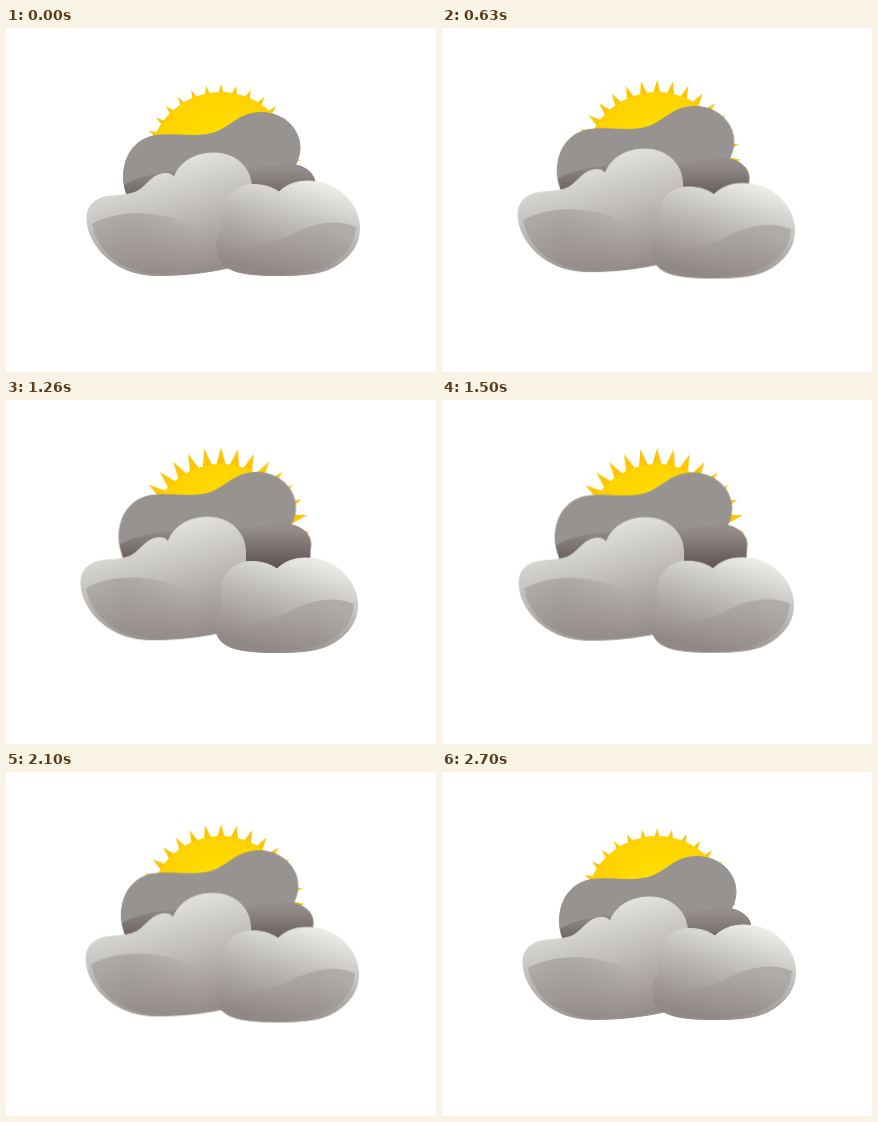
Animation of 430 by 344 pixels, one loop 2.73 s. Source, as an HTML page:

```html
<!DOCTYPE html>
<html lang="en">
<head>
<meta charset="utf-8">
<title>Sun behind clouds</title>
<style>
  html, body { margin: 0; width: 100%; height: 100%; overflow: hidden; background: #fff; }
  svg { display: block; width: 430px; height: 344px; }
  #rays { transform-origin: 215px 136px; }
</style>
</head>
<body>
<svg viewBox="0 0 430 344">
  <defs>
    <radialGradient id="sun" gradientUnits="userSpaceOnUse" cx="215" cy="122" r="84">
      <stop offset=".2" stop-color="#ffdf00"/>
      <stop offset="1" stop-color="#ffca00"/>
    </radialGradient>
    <linearGradient id="backShade" gradientUnits="userSpaceOnUse" x1="0" y1="142" x2="0" y2="176">
      <stop offset="0" stop-color="#928d8a"/>
      <stop offset="1" stop-color="#645856"/>
    </linearGradient>
    <linearGradient id="leftFill" gradientUnits="userSpaceOnUse" x1="145" y1="130" x2="176" y2="248">
      <stop offset="0" stop-color="#e8e8e5"/>
      <stop offset=".5" stop-color="#bfbcb9"/>
      <stop offset="1" stop-color="#958d8b"/>
    </linearGradient>
    <linearGradient id="leftShade" gradientUnits="userSpaceOnUse" x1="120" y1="184" x2="150" y2="248">
      <stop offset="0" stop-color="#adaaa7"/>
      <stop offset="1" stop-color="#8f8785"/>
    </linearGradient>
    <linearGradient id="rightFill" gradientUnits="userSpaceOnUse" x1="300" y1="152" x2="272" y2="248">
      <stop offset="0" stop-color="#ebebe8"/>
      <stop offset=".5" stop-color="#b9b6b3"/>
      <stop offset="1" stop-color="#918987"/>
    </linearGradient>
    <linearGradient id="rightShade" gradientUnits="userSpaceOnUse" x1="305" y1="194" x2="285" y2="248">
      <stop offset="0" stop-color="#afaba8"/>
      <stop offset="1" stop-color="#8f8785"/>
    </linearGradient>
    <linearGradient id="fadeRight">
      <stop offset=".4" stop-color="#fff"/>
      <stop offset="1" stop-color="#000"/>
    </linearGradient>
    <linearGradient id="fadeLeft">
      <stop offset=".1" stop-color="#000"/>
      <stop offset=".7" stop-color="#fff"/>
    </linearGradient>
    <mask id="leftMask" maskUnits="userSpaceOnUse" x="80" y="180" width="110" height="70">
      <rect x="80" y="180" width="110" height="70" fill="url(#fadeRight)"/>
    </mask>
    <mask id="rightMask" maskUnits="userSpaceOnUse" x="212" y="185" width="142" height="65">
      <rect x="212" y="185" width="142" height="65" fill="url(#fadeLeft)"/>
    </mask>
  </defs>

  <path id="rays" fill="#fdc400"/>
  <circle cx="215" cy="136" r="72" fill="url(#sun)"/>

  <g id="back">
    <path fill="#979390" stroke="#979390" d="M121 167C118 160 117 152 117.500 146C119 124 132 108 155 107C174 106 189 109.500 206 105.500C224 100.500 232 84.500 255 84.500C278 84.500 294 101 294 120C294 126 292 132 289.500 137C300 139 309 146 309 156L306 196H130Z"/>
    <path fill="url(#backShade)" stroke="url(#backShade)" d="M118.500 157C136 147 160 143 200 143C240 143 262 137 289.500 137C300 139 309 146 309 156L306 196H130L121 167Z"/>
  </g>

  <g id="left">
    <path fill="url(#leftFill)" stroke="url(#leftFill)" d="M81 190C81 177 90 169 106 168C116 167 123 167 131 163.500C142 157 146 146 159 145.500C165 145.500 167 147 168 150C173 134 189 125 208 125C230 125 245.500 140 245.500 160V215C245.500 229 236 237 222 240C200 245 176 247.500 152 247.500C126 247.500 108 238 95 224C86 213 81 202 81 190Z"/>
    <path fill="url(#leftShade)" mask="url(#leftMask)" d="M86 196C108 183 144 182 173 192L200 206V243C183 246 167 247 151 246C124 244 106 234 95 218C89 209 87 202 86 196Z"/>
  </g>

  <g id="right">
    <path fill="url(#rightFill)" stroke="url(#rightFill)" d="M273 164C281 156 291 153 302 153C332 153 353.500 176 353.500 200C353.500 216 345 228 331 237C317 246 298 247.500 272 247.500C250 247.500 232 246 222 240C215 236 211.500 229 211 220C210.500 212 211.500 206 217.500 202C216.500 196 217 190 217.500 184C219 167 231 156.500 247 156.500C258 156.500 266 159 273 164Z"/>
    <path fill="url(#rightShade)" mask="url(#rightMask)" d="M350 199C329 190 306 195 284 207C264 218 236 215 216 234C230 245 258 247 278 246C302 245 322 240 336 228C345 220 349 210 350 199Z"/>
  </g>
</svg>
<script>
const $ = id => document.getElementById(id);
const LOOP = 2730, TURN = 1350, REST = 2700;

// Sun rays: a ring of narrow, slightly hollow points
const polar = (r, a) =>
  `${(215 + r * Math.sin(a)).toFixed(2)} ${(136 - r * Math.cos(a)).toFixed(2)}`;
const RAYS = 33, step = 2 * Math.PI / RAYS;
let d = 'M' + polar(60, -step / 2);
for (let i = 0; i < RAYS; i++) {
  const a = i * step;
  d += `Q${polar(68, a - step * .25)} ${polar(80, a)}`;
  d += `Q${polar(68, a + step * .25)} ${polar(60, a + step / 2)}`;
}
$('rays').setAttribute('d', d + 'Z');

const move = (x, y) => `translate(${x}px, ${y}px)`;

// Each row: time in ms, transform
function play(id, rows) {
  $(id).animate(
    rows.map(([t, transform]) => ({ offset: t / LOOP, transform })),
    { duration: LOOP, iterations: Infinity }
  );
}
const swing = (id, from, to) =>
  play(id, [[0, from], [TURN, to], [REST, from], [LOOP, from]]);

swing('rays', 'scale(1)', 'scale(1.115)');
swing('back', move(0, 0), move(-4.8, -13));
swing('right', move(0, 0), move(-2.2, 5.3));

// The left cloud drifts out and turns back before it reaches its top
const rise = t => -8.3 * (t < TURN ? t / TURN : (REST - t) / TURN);
const drift = [[0, 0], [1060, -8.3], [TURN, -5], [1500, -3.9], [1640, -2.9], [2100, -.9], [REST, 0]];
play('left', [...drift.map(([t, x]) => [t, move(x, rise(t))]), [LOOP, move(0, 0)]]);
</script>
</body>
</html>
```
